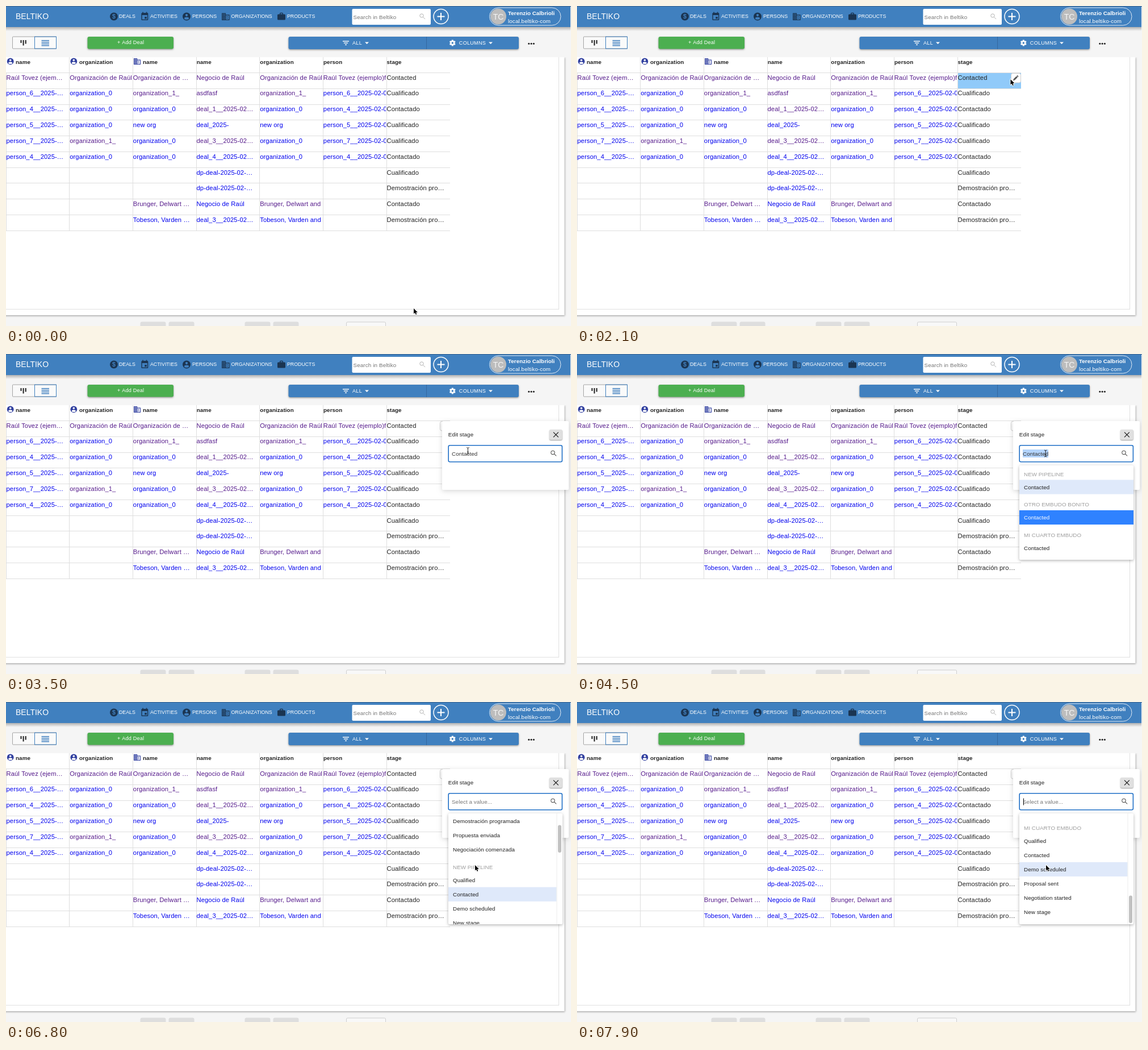
Animation of 995 by 563 pixels, one loop 8000 ms. Source, as an HTML page with a canvas:

```html
<!DOCTYPE html>
<html lang="en">
<head>
<meta charset="utf-8">
<title>Deals table: edit stage</title>
<style>
html, body { margin: 0; width: 995px; height: 563px; overflow: hidden; background: #f5f5f5; }
canvas { display: block; width: 995px; height: 563px; }
</style>
</head>
<body>
<canvas id="stage"></canvas>
<script>
const W = 995, H = 563, LOOP = 8000, STEP = 100;
const BLUE = '#4080bf', NAVY = '#1b3552', INK = '#212121', INDIGO = '#303f9f';
const LINK = '#0000ee', SEEN = '#551a8b', PALE = '#dfe9fa';
const canvas = document.getElementById('stage');
const ctx = canvas.getContext('2d');
const dpr = window.devicePixelRatio || 1;
canvas.width = W * dpr;
canvas.height = H * dpr;

// ---- drawing helpers ----
function text(s, x, y, size, color, { bold = false, gap = 0.08, align = 'left' } = {}) {
  ctx.font = `${bold ? 'bold ' : ''}${size}px "Liberation Sans", Arial, sans-serif`;
  ctx.letterSpacing = gap + 'px';
  ctx.textAlign = align;
  ctx.fillStyle = color;
  ctx.fillText(s, x, y);
}
function rect(x, y, w, h, color) {
  ctx.fillStyle = color;
  ctx.fillRect(x, y, w, h);
}
function box(x, y, w, h, r, fill, stroke, lw = 1) {
  ctx.beginPath();
  ctx.roundRect(x, y, w, h, r);
  if (fill) { ctx.fillStyle = fill; ctx.fill(); }
  if (stroke) { ctx.strokeStyle = stroke; ctx.lineWidth = lw; ctx.stroke(); }
}
function raised(blur, dy, alpha, draw) {
  ctx.save();
  ctx.shadowColor = `rgba(0,0,0,${alpha})`;
  ctx.shadowBlur = blur * dpr;
  ctx.shadowOffsetY = dy * dpr;
  draw();
  ctx.restore();
}
function line(color, lw, ...pts) {
  ctx.strokeStyle = color;
  ctx.lineWidth = lw;
  ctx.beginPath();
  for (let i = 0; i < pts.length; i += 2) ctx.lineTo(pts[i], pts[i + 1]);
  ctx.stroke();
}
function poly(fill, ...pts) {
  ctx.fillStyle = fill;
  ctx.beginPath();
  for (let i = 0; i < pts.length; i += 2) ctx.lineTo(pts[i], pts[i + 1]);
  ctx.closePath();
  ctx.fill();
}
function disc(x, y, r, color) {
  ctx.fillStyle = color;
  ctx.beginPath();
  ctx.arc(x, y, r, 0, 7);
  ctx.fill();
}
function ring(x, y, r, color, lw) {
  ctx.strokeStyle = color;
  ctx.lineWidth = lw;
  ctx.beginPath();
  ctx.arc(x, y, r, 0, 7);
  ctx.stroke();
}
function clipped(x, y, w, h, draw) {
  ctx.save();
  ctx.beginPath();
  ctx.rect(x, y, w, h);
  ctx.clip();
  draw();
  ctx.restore();
}

// ---- icons ----
function personIcon(x, y, r, color, hole) {
  disc(x, y, r, color);
  disc(x, y - r * 0.35, r * 0.3, hole);
  ctx.beginPath();
  ctx.ellipse(x, y + r * 0.48, r * 0.58, r * 0.32, 0, 0, 7);
  ctx.fill();
}
function buildingIcon(x, y, s, color, hole) {
  rect(x, y, s * 0.52, s * 0.92, color);
  rect(x + s * 0.5, y + s * 0.2, s * 0.5, s * 0.72, color);
  for (let i = 0; i < 4; i++) {
    const yy = y + s * (0.1 + i * 0.2);
    rect(x + s * 0.1, yy, s * 0.12, s * 0.1, hole);
    rect(x + s * 0.31, yy, s * 0.12, s * 0.1, hole);
  }
  rect(x + s * 0.53, y + s * 0.29, s * 0.38, s * 0.54, hole);
  rect(x + s * 0.63, y + s * 0.38, s * 0.13, s * 0.12, color);
  rect(x + s * 0.63, y + s * 0.6, s * 0.13, s * 0.12, color);
}
function calendarIcon(x, y) {
  box(x, y + 1, 12, 13, 1.5, NAVY);
  rect(x + 2, y - 0.5, 1.5, 2, NAVY);
  rect(x + 8.5, y - 0.5, 1.5, 2, NAVY);
  rect(x + 1.4, y + 5, 9.2, 7.6, BLUE);
  rect(x + 6, y + 8, 3.4, 3.4, NAVY);
}
function briefcaseIcon(x, y) {
  box(x, y + 3, 14, 10, 1.5, NAVY);
  box(x + 4.7, y + 0.9, 4.6, 3, 0.8, null, NAVY, 1.4);
}
function lens(x, y, r, color, lw) {
  ring(x, y, r, color, lw);
  line(color, lw, x + r * 0.7, y + r * 0.7, x + r * 1.9, y + r * 1.9);
}
function caretDown(x, y) { poly('#fff', x - 3.5, y - 1.7, x + 3.5, y - 1.7, x, y + 1.9); }
function gearIcon(x, y) {
  ctx.save();
  ctx.translate(x, y);
  for (let i = 0; i < 6; i++) {
    rect(-1.5, -5.4, 3, 3.5, '#fff');
    ctx.rotate(Math.PI / 3);
  }
  disc(0, 0, 4, '#fff');
  disc(0, 0, 1.8, BLUE);
  ctx.restore();
}

// ---- page ----
function topBar() {
  const g = ctx.createLinearGradient(0, 37, 0, 44);
  g.addColorStop(0, 'rgba(0,0,0,.28)');
  g.addColorStop(1, 'rgba(0,0,0,0)');
  rect(0, 37, 994, 7, g);
  rect(0, 0, 994, 37, BLUE);
  rect(0, 0, W, 1, '#3a648f');
  text('BELTIKO', 17, 23.2, 14, '#fff', { gap: 0 });

  disc(190, 18.5, 7, NAVY);
  text('$', 190, 22.4, 10.5, BLUE, { bold: true, align: 'center', gap: 0 });
  calendarIcon(238.3, 11);
  personIcon(318, 18.5, 7, NAVY, BLUE);
  buildingIcon(380, 12.5, 13.6, NAVY, BLUE);
  briefcaseIcon(478, 11.5);
  [['DEALS', 199], ['ACTIVITIES', 254], ['PERSONS', 328], ['ORGANIZATIONS', 396.5], ['PRODUCTS', 495]]
    .forEach(([s, x]) => text(s, x, 21.4, 8.8, '#fff', { gap: 0 }));

  box(609.5, 5, 138.5, 28, 2, '#fff');
  text('Search in Beltiko', 611.5, 22.6, 9.8, '#757575', { gap: 0.14 });
  lens(732, 17, 3.2, '#b5b5b5', 1);
  ring(766, 18.5, 13, '#fff', 1.5);
  line('#fff', 2, 759.5, 18.5, 772.5, 18.5);
  line('#fff', 2, 766, 12, 766, 25);

  box(851.5, 3, 125.5, 31, 15.5, null, '#e3ecf5', 1);
  disc(867, 18.5, 14, '#bdbdbd');
  text('TC', 867, 23.5, 14, '#f5f5f5', { gap: 0, align: 'center' });
  text('Terenzio Calbrioli', 884, 15.6, 9.8, '#fff', { bold: true, gap: 0.05 });
  text('local.beltiko-com', 884, 29.6, 9.8, '#fff', { gap: 0.12 });
}

function toolbar() {
  box(11.5, 54, 77, 21, 1, '#fafafa', '#a5a5a5', 1);
  ctx.strokeStyle = BLUE;
  ctx.strokeRect(50.5, 54, 38, 21);
  rect(25.5, 60, 2, 5, INK);
  rect(29.6, 60, 2, 9.5, INK);
  rect(33.7, 60, 2, 6.5, INK);
  for (let i = 0; i < 4; i++) rect(62.5, 60 + i * 3, 13.5, 1.4, '#2f74ba');

  raised(3, 1.2, 0.4, () => box(143.5, 54, 151.5, 21.5, 3, '#4caf50'));
  text('+ Add Deal', 196, 67.4, 9.1, '#fff', { gap: 0.2 });

  raised(3, 1.2, 0.4, () => box(497.5, 54, 405.5, 22, 3, BLUE));
  rect(740, 54, 1, 22, '#3468a0');
  rect(593, 61.3, 11, 1.4, '#fff');
  rect(594.9, 64.4, 7.2, 1.4, '#fff');
  rect(597, 67.5, 3, 1.4, '#fff');
  text('ALL', 610, 68, 9.1, '#fff', { gap: 0.26 });
  caretDown(635.5, 65.2);
  gearIcon(786.3, 65);
  text('COLUMNS', 797.8, 68, 9.1, '#fff', { gap: 0.26 });
  caretDown(853.5, 65.2);
  for (const x of [920.8, 925.1, 929.4]) disc(x, 66.3, 1.5, INK);
}

// A leading * marks a visited link.
const ORG = 'organization_0', ORG1 = '*organization_1_';
const person = (n) => [`person_${n}__2025-…`, `person_${n}__2025-02-05`];
const [P4, P4L] = person(4), [P5, P5L] = person(5), [P6, P6L] = person(6), [P7, P7L] = person(7);
const ROWS = [
  ['*Raúl Tovez (ejem…', '*Organización de Raúl', '*Organización de …', '*Negocio de Raúl', '*Organización de Raúl', '*Raúl Tovez (ejemplo)f', 'Contacted'],
  [P6, ORG, ORG1, '*asdfasf', ORG1, P6L, 'Cualificado'],
  [P4, ORG, ORG, '*deal_1__2025-02…', ORG, P4L, 'Contactado'],
  [P5, ORG, 'new org', 'deal_2025-', 'new org', P5L, 'Cualificado'],
  [P7, ORG1, ORG, '*deal_3__2025-02…', ORG, P7L, 'Cualificado'],
  [P4, ORG, ORG, 'deal_4__2025-02…', ORG, P4L, 'Contactado'],
  ['', '', '', 'dp-deal-2025-02-…', '', '', 'Cualificado'],
  ['', '', '', 'dp-deal-2025-02-…', '', '', 'Demostración pro…'],
  ['', '', '*Brunger, Delwart …', 'Negocio de Raúl', '*Brunger, Delwart and', '', 'Contactado'],
  ['', '', 'Tobeson, Varden …', 'deal_3__2025-02…', 'Tobeson, Varden and T', '', 'Demostración pro…'],
];
const HEADS = [['name', 17], ['organization', 129], ['name', 241], ['name', 335.7], ['organization', 447.3], ['person', 559], ['stage', 670.5]];
const colX = (c) => c * 111.67;
const rowY = (r) => Math.round(117 + r * 27.78);

function table(hover) {
  raised(3, 1, 0.4, () => rect(-4, 90, 987.5, 454, '#fff'));
  rect(0, 84, W, 6, '#f5f5f5');
  rect(973, 90, 1, 444, '#e0e0e0');
  rect(0, 533, 974, 1, '#e0e0e0');

  if (hover) rect(670.5, 118, 111.5, 27, '#90caf9');
  for (let r = 0; r <= 10; r++) rect(0, rowY(r), 782, 1, '#dedede');
  for (let c = 0; c < 7; c++) {
    const top = c ? 90 : 117;
    rect(Math.floor(colX(c)), top, 1, rowY(10) - top, '#dedede');
  }

  personIcon(7.7, 97.3, 5.9, INDIGO, '#fff');
  personIcon(119.3, 97.3, 5.9, INDIGO, '#fff');
  buildingIcon(225, 92, 12, INDIGO, '#fff');
  for (const [s, x] of HEADS) text(s, x, 102.2, 9.8, INK, { bold: true, gap: 0.1 });

  ROWS.forEach((row, r) => row.forEach((cell, c) => {
    const seen = cell[0] === '*';
    const color = c === 6 ? INK : seen ? SEEN : LINK;
    clipped(colX(c), rowY(r), 111, 28, () =>
      text(seen ? cell.slice(1) : cell, colX(c) + 0.5, 129.6 + r * 27.83, 11.2, color, { gap: 0.105 }));
  }));
}

function footer() {
  for (const x of [236.5, 286.5, 420.5, 470.5]) box(x, 555.5, 45, 20, 3, '#dedede');
  box(599.5, 556, 69, 20, 2, '#f8f8f8', '#cfcfcf', 1);
}

function pencilButton() {
  box(764.5, 118.5, 17, 16.5, 3, '#fff', '#cfcfcf', 1);
  ctx.save();
  ctx.translate(772.3, 127);
  ctx.rotate(Math.PI / 4);
  rect(-1.5, -6, 3, 1.8, '#555');
  rect(-1.5, -3.6, 3, 7.2, '#555');
  poly('#555', -1.5, 3.6, 1.5, 3.6, 0, 6);
  ctx.restore();
}

// ---- stage editor ----
function editor(filled, selected, caret) {
  raised(8, 2, 0.16, () => box(768, 118, 223, 121, 2, '#fff'));
  text('Edit stage', 778.8, 145, 9.8, INK);
  raised(2, 1, 0.4, () => box(957, 133, 22.5, 18, 2.5, '#e0e0e0'));
  line(INK, 1.3, 964, 137.6, 972.8, 146.4);
  line(INK, 1.3, 972.8, 137.6, 964, 146.4);
  box(779.2, 160.8, 200.2, 29, 2.5, '#fff', '#1f6fc6', 1.6);
  lens(963, 173.4, 3.2, '#555', 1.1);
  if (filled) {
    if (selected) rect(785, 168, 45, 14, '#b3d4fc');
    text('Contacted', 785, 178.8, 9.8, '#333');
  } else {
    text('Select a value...', 785, 178.8, 9.8, '#757575');
    if (caret) rect(786, 169.5, 1, 12, '#000');
  }
}

const GROUPS = [
  ['EMBUDO', 'Cualificado', 'Contactado', 'Demostración programada', 'Propuesta enviada', 'Negociación comenzada'],
  ['NEW PIPELINE', 'Qualified', 'Contacted', 'Demo scheduled', 'New stage', 'Proposal sent', 'Negotiation started', 'New stage', 'New stage'],
  ['OTRO EMBUDO BONITO', 'Qualified', 'Contacted', 'Demo scheduled', 'Proposal sent', 'Negotiation started', 'New stage', 'New stage'],
  ['MI CUARTO EMBUDO', 'Qualified', 'Contacted', 'Demo scheduled', 'Proposal sent', 'Negotiation started', 'New stage'],
];
const FOUND = GROUPS.slice(1).map(([head]) => [head, 'Contacted']);
const LIST_Y = 196, ITEM = 25.15;

function list(groups, height, scroll, width, hoverY, active) {
  raised(5, 1.5, 0.3, () => box(779, LIST_Y, 201, height, 2, '#fff'));
  clipped(779, LIST_Y, 201, height, () => {
    let y = LIST_Y + 15 - scroll;
    groups.forEach(([head, ...items]) => {
      text(head, 787, y + 3.6, 9.8, '#9e9e9e', { gap: 0.05 });
      y += 23;
      items.forEach((s, i) => {
        const on = head === active && s === 'Contacted';
        const lit = (head === 'NEW PIPELINE' && s === 'Contacted') || Math.abs(y - hoverY) < ITEM / 2;
        if (on || lit) rect(779, y - ITEM / 2, width, ITEM, on ? '#2f82ff' : PALE);
        text(s, 787, y + 3.6, 9.8, on ? '#fff' : INK);
        y += i < items.length - 1 ? ITEM : 30.5;
      });
    });
  });
}
const MAX_SCROLL = 578;
function fullList(scroll, hoverY) {
  list(GROUPS, 195, scroll, 190.5, hoverY);
  rect(969.5, LIST_Y, 1, 195, '#ececec');
  box(972, 198 + 142.5 * scroll / MAX_SCROLL, 6, 48.5, 3, '#c1c1c1');
}

// ---- pointer ----
function pathOf(pts) {
  ctx.beginPath();
  for (let i = 0; i < pts.length; i += 2) ctx.lineTo(pts[i], pts[i + 1]);
  ctx.closePath();
}
const ARROW = [0, 0, 0, 9.6, 2.2, 7.6, 3.7, 11, 5.3, 10.3, 3.9, 7, 6.9, 7];
const HAND = [-1.1, 0.6, 0, -0.4, 1.1, 0.6, 1.3, 3.8, 2.8, 3.6, 4.2, 4.2, 5.5, 4.5, 6.2, 5.5, 6, 8.2, 5, 10, 4.9, 11.3, -0.2, 11.3, -0.8, 9.6, -3.2, 6.6, -2.7, 5.6, -1, 6.6];
function pointer(kind, x, y) {
  ctx.save();
  ctx.translate(x, y);
  ctx.lineJoin = 'round';
  if (kind === 'arrow') {
    pathOf(ARROW);
    ctx.strokeStyle = '#fff';
    ctx.lineWidth = 1.8;
    ctx.stroke();
    ctx.fillStyle = '#000';
    ctx.fill();
  } else if (kind === 'hand') {
    pathOf(HAND);
    ctx.fillStyle = '#fff';
    ctx.fill();
    ctx.strokeStyle = '#000';
    ctx.lineWidth = 1;
    ctx.stroke();
    line('#000', 0.7, 1.3, 7, 1.3, 9.6);
    line('#000', 0.7, 3.2, 7, 3.2, 9.6);
  } else if (kind === 'beam') {
    line('#222', 1, -2.2, -6, 0, -5, 2.2, -6);
    line('#222', 1, 0, -5, 0, 5);
    line('#222', 1, -2.2, 6, 0, 5, 2.2, 6);
    line('#222', 1, -1.4, 2, 1.4, 2);
  }
  ctx.restore();
}

// ---- timeline ----
function along(keys, t) {
  let a = keys[0];
  for (const b of keys) {
    if (t < b[0]) {
      const k = Math.max(0, (t - a[0]) / (b[0] - a[0] || 1));
      return a.slice(1).map((v, i) => v + (b[i + 1] - v) * k);
    }
    a = b;
  }
  return a.slice(1);
}
const MOVE = [
  [0, 718, 532], [1100, 718, 532], [1200, 718, 480], [1400, 706, 336], [1500, 705, 285], [1600, 708, 242],
  [1800, 732, 172], [2000, 757, 130], [2200, 770, 128], [2400, 780, 128], [2800, 780, 130],
  [3100, 790, 152], [3400, 812, 170], [4300, 825, 174], [5500, 826, 180], [5800, 826, 287],
];
const SCROLL = [[0, 0], [5700, 0], [5800, 12], [5900, 43], [6000, 48], [6700, 48], [6800, 75], [7100, 284.6], [7400, 490], [7600, MAX_SCROLL]];
const KINDS = [[2200, 'arrow'], [2800, 'hand'], [3300, 'arrow'], [4900, 'beam'], [5600, 'none'], [LOOP, 'arrow']];

function draw(t) {
  const [x, y] = along(MOVE, t);
  const [scroll] = along(SCROLL, t);
  const open = t >= 2800, cleared = t >= 4900, picked = t >= 3800;

  ctx.setTransform(dpr, 0, 0, dpr, 0, 0);
  rect(0, 0, W, H, '#f5f5f5');
  table(t >= 2100 && !open);
  topBar();
  toolbar();
  footer();
  if (t >= 2100) pencilButton();
  if (open) editor(!cleared, picked, Math.floor((t - 4900) / 500) % 2 === 0);
  if (cleared) {
    const still = (t >= 5600 && t < 6800) || t >= 7600;
    fullList(scroll, still ? y : -99);
  } else if (picked) {
    list(FOUND, 166, 0, 201, -99, 'OTRO EMBUDO BONITO');
  }
  pointer(KINDS.find(([end]) => t < end)[1], x, y);
}

let start;
function tick(now) {
  start ??= now;
  draw(Math.floor(((now - start) % LOOP) / STEP) * STEP);
  requestAnimationFrame(tick);
}
draw(0);
requestAnimationFrame(tick);
</script>
</body>
</html>
```
